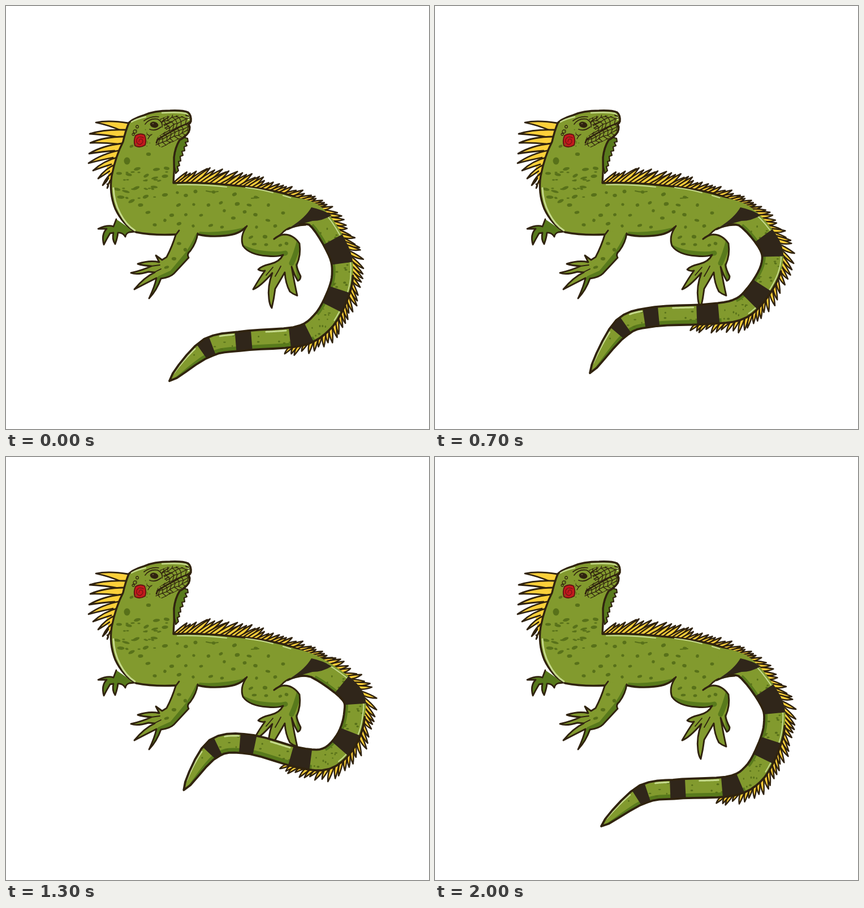
Write an HTML page with a canvas that moves like this. It is 748 px wide and 748 px high and loops after 2.1 s.

```html
<!DOCTYPE html>
<html>
<head>
<meta charset="utf-8">
<title>Iguana</title>
<style>
html, body { margin: 0; width: 100%; height: 100%; overflow: hidden; background: #fff; }
canvas { display: block; }
</style>
</head>
<body>
<canvas id="stage" width="748" height="748"></canvas>
<script>
const ctx = document.getElementById('stage').getContext('2d');
const INK = '#30230f', GREEN = '#829a2e', SHADE = '#587a1c', SPOT = '#58711a',
      LIGHT = '#c5d98c', YELLOW = '#fcd03a', STRIPE = '#30261a', RED = '#c3191d';
const LOOP = 2100, STEP = 100;

const rnd = i => { const v = Math.sin(i * 127.1 + 3.7) * 43758.5453; return v - Math.floor(v); };
const mix = (a, b, k) => a + (b - a) * k;

function fill(d, color) { ctx.fillStyle = color; ctx.fill(new Path2D(d)); }
function line(d, width = 3.4, color = INK) {
  ctx.strokeStyle = color;
  ctx.lineWidth = width;
  ctx.stroke(new Path2D(d));
}
function blob(x, y, rx, ry, color, turn = 0) {
  ctx.fillStyle = color;
  ctx.beginPath();
  ctx.ellipse(x, y, rx, ry, turn, 0, 7);
  ctx.fill();
}
function trace(pts) {
  ctx.beginPath();
  pts.forEach(p => ctx.lineTo(p[0], p[1]));
}

// Catmull-Rom point on a list of points; u counts points
function spline(pts, u) {
  const n = pts.length - 1, i = Math.min(Math.floor(u), n - 1), f = u - i;
  const at = k => pts[Math.max(0, Math.min(n, k))];
  return [0, 1].map(c => {
    const a = at(i - 1)[c], b = at(i)[c], d = at(i + 1)[c], e = at(i + 2)[c];
    return b + f * ((d - a) + f * ((2 * a - 5 * b + 4 * d - e) + f * (3 * b - a - 3 * d + e))) / 2;
  });
}
function heading(pts, u) {
  const n = pts.length - 1;
  const a = spline(pts, Math.max(0, u - .03)), b = spline(pts, Math.min(n, u + .03));
  const dx = b[0] - a[0], dy = b[1] - a[1], l = Math.hypot(dx, dy) || 1;
  return [dx / l, dy / l];
}

// One curved spine; lean is the share of the direction along the edge
function spike(p, t, length, lean, half) {
  const out = Math.sqrt(1 - lean * lean), n = [t[1], -t[0]];
  const tip = [0, 1].map(c => p[c] + length * (t[c] * lean + n[c] * out));
  const bend = [0, 1].map(c => p[c] + length * .55 * (t[c] * (lean - .16) + n[c] * (out + .12)));
  const inner = [0, 1].map(c => p[c] + t[c] * half + length * .5 * (t[c] * lean + n[c] * out * .85));
  ctx.beginPath();
  ctx.moveTo(p[0] - t[0] * half, p[1] - t[1] * half);
  ctx.quadraticCurveTo(...bend, ...tip);
  ctx.quadraticCurveTo(...inner, p[0] + t[0] * half, p[1] + t[1] * half);
  ctx.fillStyle = YELLOW;
  ctx.fill();
  ctx.strokeStyle = INK;
  ctx.lineWidth = 2.5;
  ctx.stroke();
}

// Body outlines
const headBack = '217,207 Q222,200 244,193 Q262,185 290,185 Q313,184 322,188 Q328,193 327,204' +
  ' L323,210 Q327,213 323,223 Q317,232 307,237 Q299,250 297,268 Q298,290 296,313';
const back = ' Q345,311 400,317 Q450,321 490,331 Q520,339 546,355';
const rump = ' L530,386 Q510,387 498,395 L474,412';
const belly = '424,391 Q412,404 388,406 Q362,409 340,404';
const chest = '300,404 Q260,406 230,400 Q206,386 193,358 Q182,330 187,300 Q194,265 207,240 Q211,222 217,207';
const foreLeg = 'M306,397 L300,405 Q294,425 284,444 L276,449 L265,441 L271,453 Q254,449 233,456 Q242,459 257,460' +
  ' Q242,467 221,472 Q232,476 252,470 L263,471 Q244,480 227,501 Q246,491 266,481 Q263,496 253,517' +
  ' Q267,502 274,482 Q290,480 297,473 L323,445 Q319,438 326,433 Q337,418 339,402';
const hindLeg = 'M426,389 Q413,407 419,424 Q430,440 462,442 Q480,444 490,440 Q484,452 468,456 Q451,460 446,466' +
  ' Q452,470 458,468 Q449,480 437,501 Q449,497 471,472 Q462,496 465,518 Q466,528 470,534 Q474,517 476,500' +
  ' Q485,485 493,471 Q494,490 502,505 Q508,510 515,512 Q510,490 505,461 Q510,476 516,486 Q521,484 521,478' +
  ' Q514,464 514,458 Q522,440 519,420 Q508,404 492,404 Q482,405 474,412';
const farLeg = 'M195,377 L190,390 Q180,386 163,394 L178,394 Q168,404 173,422 Q178,412 184,402 L190,401' +
  ' Q187,412 193,421 Q197,410 198,401 Q206,400 211,408 Q212,402 218,400 L227,399';
const dewlap = 'M307,237 L313,232 L321,234 L322,240 L317,241 L320,247 L315,249 L316,256 L311,257 L313,264 L308,266' +
  ' L309,274 L305,275 L307,282 L303,284 L305,291 L300,296 L298,285 Q294,262 307,237Z';

// Neck crest: root x, y, then tip x, y
const crest = [
  [210, 213, 159, 206], [206, 225, 148, 226], [203, 237, 149, 242], [199, 249, 147, 261],
  [196, 261, 146, 278], [193, 273, 154, 291], [190, 285, 163, 305], [188, 297, 171, 317], [186, 308, 179, 322]];

const spots = [
  [214, 274], [222, 248], [252, 262], [266, 289], [232, 288], [284, 287], [200, 296], [217, 298], [248, 300],
  [263, 304], [281, 301], [196, 324], [212, 328], [230, 322], [262, 320], [247, 337], [281, 334], [222, 345],
  [203, 338], [251, 365], [238, 352], [303, 330], [318, 335], [335, 328], [367, 329], [404, 333], [442, 338],
  [305, 352], [332, 351], [358, 352], [380, 348], [409, 350], [430, 352], [464, 352], [293, 370], [318, 369],
  [345, 370], [386, 362], [402, 375], [422, 364], [441, 369], [463, 379], [490, 366], [505, 352], [263, 387],
  [281, 379], [306, 385], [331, 389], [362, 388], [382, 391], [443, 391], [476, 389], [433, 409], [458, 408],
  [460, 422], [485, 423], [496, 420], [439, 421], [306, 420], [317, 431], [297, 447], [284, 462]];

const backCurve = [[296, 314], [345, 313], [400, 318], [450, 323], [495, 333], [535, 349], [560, 362]];

// Tail: poses of the landmarks after the fixed root
const times = [0, 400, 700, 1100, 1500, 1800, 2000];
const poses = [
  [588, 433, 595, 476, 584, 517, 559, 559, 517, 584, 422, 592, 355, 605, 289, 663],
  [586, 431, 585, 476, 566, 522, 540, 555, 490, 573, 397, 588, 337, 608, 271, 674],
  [592, 423, 594, 464, 567, 511, 535, 537, 479, 545, 384, 550, 329, 570, 274, 649],
  [606, 419, 610, 456, 591, 499, 557, 527, 502, 525, 411, 505, 350, 520, 303, 597],
  [611, 418, 619, 461, 607, 508, 575, 543, 533, 545, 443, 522, 380, 525, 321, 592],
  [603, 425, 611, 466, 600, 518, 571, 560, 534, 570, 442, 562, 378, 568, 312, 625],
  [594, 432, 600, 474, 588, 517, 563, 560, 522, 582, 431, 587, 366, 597, 294, 653]];
const widths = [26, 19, 19, 18.5, 19, 19, 17.5, 17, 16.5];
const stripes = [[1.68, 2.48], [3.62, 4.37], [5.66, 6.19], [6.86, 7.21], [7.85, 8.13]];
const gaps = [48, 75, 42, 43, 48, 50, 95];

function tailAt(ms) {
  const n = times.length;
  const time = k => times[(k + n) % n] + LOOP * Math.floor(k / n);
  let i = n - 1;
  while (times[i] > ms) i--;
  const h = time(i + 1) - time(i), f = (ms - time(i)) / h;
  const pose = k => poses[(k + n) % n];
  const slope = (k, c) => (pose(k + 1)[c] - pose(k - 1)[c]) / (time(k + 1) - time(k - 1));
  const v = poses[i].map((a, c) => {
    const b = pose(i + 1)[c], g = f * f * (3 - 2 * f);
    return mix(a, b, g) + h * f * (1 - f) * ((1 - f) * slope(i, c) - f * slope(i + 1, c));
  });
  const pts = [[500, 362], [548, 372]];
  for (let k = 0; k < v.length; k += 2) pts.push([v[k], v[k + 1]]);
  return pts;
}

function halfWidth(u) {
  if (u >= 8) return widths[8] * Math.pow(Math.max(0, 9 - u), .72);
  const i = Math.floor(u);
  return mix(widths[i], widths[i + 1], u - i);
}
// Point across the tail: side 1 is the spiny edge, -1 the smooth one
function across(pts, u, side) {
  const p = spline(pts, u), t = heading(pts, u), w = halfWidth(u) * side;
  return [p[0] + t[1] * w, p[1] - t[0] * w];
}
function edge(pts, from, to, side) {
  const list = [];
  for (let k = 0; k <= 24; k++) list.push(across(pts, mix(from, to, k / 24), side));
  return list;
}
function band(pts, from, to, a, b, color) {
  trace([...edge(pts, from, to, a), ...edge(pts, from, to, b).reverse()]);
  ctx.fillStyle = color;
  ctx.fill();
}
function edgeLine(pts, from, to, side, width, color) {
  trace(edge(pts, from, to, side));
  ctx.strokeStyle = color;
  ctx.lineWidth = width;
  ctx.stroke();
}

function drawTail(pts) {
  let i = 0;
  for (let u = 1.1; u < 6.25; u += 7.6 / gaps[Math.floor(u)]) {
    const size = (u < 1.6 ? 17 : u > 5.4 ? 14 : 20) + 7 * rnd(++i);
    spike(across(pts, u, .95), heading(pts, u), size, .6 + .2 * rnd(i + 40), 4.2);
  }
  const rim = [...edge(pts, 0, 4, 1), ...edge(pts, 4, 9, 1), ...edge(pts, 9, 4, -1), ...edge(pts, 4, 0, -1)];
  trace(rim);
  ctx.fillStyle = GREEN;
  ctx.fill();
  band(pts, 1.1, 4.9, -.98, -.68, SHADE);
  band(pts, 5.6, 8.9, .98, .52, SHADE);
  for (let k = 0; k < 62; k++) {
    const p = across(pts, 1.4 + 7 * rnd(k + 200), 1.4 * rnd(k + 300) - .7);
    blob(p[0], p[1], 1 + 1.7 * rnd(k + 400), 1 + rnd(k + 500), SPOT);
  }
  edgeLine(pts, 1.2, 4.7, .78, 2, LIGHT);
  [[6.25, 6.6], [7.25, 7.6], [8.2, 8.75]].forEach(s => edgeLine(pts, s[0], s[1], -.76, 3, LIGHT));
  stripes.forEach(([a, b]) => band(pts, a, b, -1, 1, STRIPE));
  fill('M540,356 Q560,360 576,370 Q560,380 542,380 Q520,386 503,391 Q530,374 540,356Z', STRIPE);
  trace(rim.slice(18, -3));
  ctx.strokeStyle = INK;
  ctx.lineWidth = 3.8;
  ctx.stroke();
}

function drawScales() {
  ctx.save();
  ctx.clip(new Path2D('M272,200 L292,192 L325,197 L325,212 L318,229 L300,238 L276,250 L264,246 L268,232 L284,220Z'));
  ctx.strokeStyle = INK;
  ctx.lineWidth = 1.3;
  const node = (c, r) => {
    const x = c * 8 + (r % 2) * 4 + 4 * rnd(c * 13 + r) - 2, y = r * 7 + 3 * rnd(c + r * 17);
    return [262 + x * .9 + y * .25, 218 - x * .42 + y * .9];
  };
  for (let r = -4; r < 8; r++) for (let c = -1; c < 10; c++) {
    trace([node(c, r + 1), node(c, r), node(c + 1, r)]);
    ctx.stroke();
  }
  ctx.restore();
}

function drawHead() {
  drawScales();
  line('M326,207 Q312,210 300,218 Q284,226 268,236 L266,242', 2.8);
  line('M246,209 Q254,198 268,200 Q278,205 276,214 M254,218 Q264,222 274,214 M244,203 Q256,194 270,196' +
    ' M276,204 L288,196 M279,210 L294,204 M281,216 L288,212', 1.7);
  blob(262, 210, 7.5, 5.2, INK, .25);
  blob(260, 208, 1.6, 1, '#6b5a3a');
  line('M318,193 L323,195', 2);
  fill('M229,229 Q237,224 245,228 Q249,238 246,246 Q236,252 228,247 Q225,238 229,229Z', RED);
  line('M229,229 Q237,224 245,228 Q249,238 246,246 Q236,252 228,247 Q225,238 229,229Z', 1.8, '#5d1512');
  line('M243,233 Q235,229 231,236 Q230,244 237,245 Q244,242 241,236 Q236,233 235,240', 1.4, '#7a1214');
  line('M228,219 a3,3 0 1 0 .1,0 M232,211 a2.4,2.4 0 1 0 .1,0 M225,225 a2,2 0 1 0 .1,0', 1.3);
  line('M249,226 l5,4 l-3,5 M254,230 l4,-3', 1.4);
  for (let i = 0; i < 14; i++) blob(222 + 36 * rnd(i + 60), 218 + 36 * rnd(i + 80), 1, 1, SPOT);
}

function drawCrest() {
  fill('M217,207 L198,207 L190,222 L186,250 L178,285 L184,318 L206,262Z', YELLOW);
  ctx.lineWidth = 2.8;
  crest.forEach(([x, y, tx, ty]) => {
    const path = `M${x + 6},${y - 6} Q${mix(x, tx, .55)},${mix(y, ty, .5) - 8} ${tx},${ty}` +
      ` Q${mix(x, tx, .5)},${mix(y, ty, .5) + 2} ${x - 7},${y + 7}`;
    fill(path, YELLOW);
    line(path, 2.8);
  });
}

function drawBackSpines() {
  let i = 0;
  for (let u = .12; u < 5.9; u += u < 2.6 ? .155 : .175) {
    const tall = u < .5 ? 25 : u < 1.8 ? 36 : u < 2.7 ? 29 : 19;
    spike(spline(backCurve, u), heading(backCurve, u), tall + 7 * rnd(++i + 700),
      .7 + .12 * rnd(i + 800), u < 2.6 ? 5 : 4.4);
  }
}

function drawBody() {
  drawBackSpines();
  drawCrest();
  fill(farLeg, SHADE);
  line(farLeg, 2.8);
  fill(dewlap, SHADE);
  line(dewlap, 2.2);
  fill('M' + headBack + back + rump + ' L430,410 L' + belly + ' L' + chest + 'Z', GREEN);
  fill('M424,391 Q412,404 388,406 Q362,409 340,404 L342,399 Q380,402 424,391Z', SHADE);
  line('M' + headBack + back);
  line('M498,395 Q510,388 530,387', 2.8);
  line('M' + belly);
  line('M' + chest);
  [hindLeg, foreLeg].forEach(d => {
    fill(d, GREEN);
    ctx.save();
    ctx.clip(new Path2D(d));
    line('M414,424 Q432,436 462,438 Q482,440 494,437 M519,414 Q513,438 505,455 M516,458 L520,486', 9, SHADE);
    line('M340,406 Q330,428 319,442 L294,472 L272,482 L254,516', 10, SHADE);
    ctx.restore();
    line(d, 2.9);
  });
  line('M474,412 Q484,406 489,401 Q493,396 502,392', 2.8);
  line('M476,478 Q482,468 486,460 M460,476 L472,462 M262,471 L274,465 M257,460 L272,458', 1.8);

  spots.forEach(([x, y], i) => {
    const neck = x < 290 && y > 280 && y < 350;
    blob(x, y, (neck ? 5 : 2.6) + 2 * rnd(i), (neck ? 2 : 2.2) + rnd(i + 90), SPOT, rnd(i + 20) * .8 - .5);
  });
  blob(214, 274, 5.5, 6.5, SPOT);
  for (let i = 0; i < 26; i++) {
    blob(205 + 80 * rnd(i + 900), 292 + 15 * Math.floor(4 * rnd(i + 930)) + 3 * rnd(i + 950), 2.6, 1.3, SPOT);
  }
  line('M354,327 Q365,330 375,328 M434,340 L447,339', 2, SPOT);

  line('M222,205 Q230,200 247,196 M276,189 Q304,187 318,190 Q323,193 323,201', 2.4, LIGHT);
  line('M190,322 Q191,347 202,367 Q212,387 228,397', 3, LIGHT);
  line('M303,316 Q345,315 390,320 M424,321 Q450,324 472,330 M490,335 Q515,342 532,351', 2.2, LIGHT);
  drawHead();
}

function draw(now) {
  const ms = Math.floor((now % LOOP) / STEP) * STEP;
  ctx.fillStyle = '#fff';
  ctx.fillRect(0, 0, 748, 748);
  ctx.lineJoin = ctx.lineCap = 'round';
  drawBody();
  drawTail(tailAt(ms));
}

let start;
function tick(now) {
  start ??= now;
  draw(now - start);
  requestAnimationFrame(tick);
}
requestAnimationFrame(tick);
</script>
</body>
</html>
```
